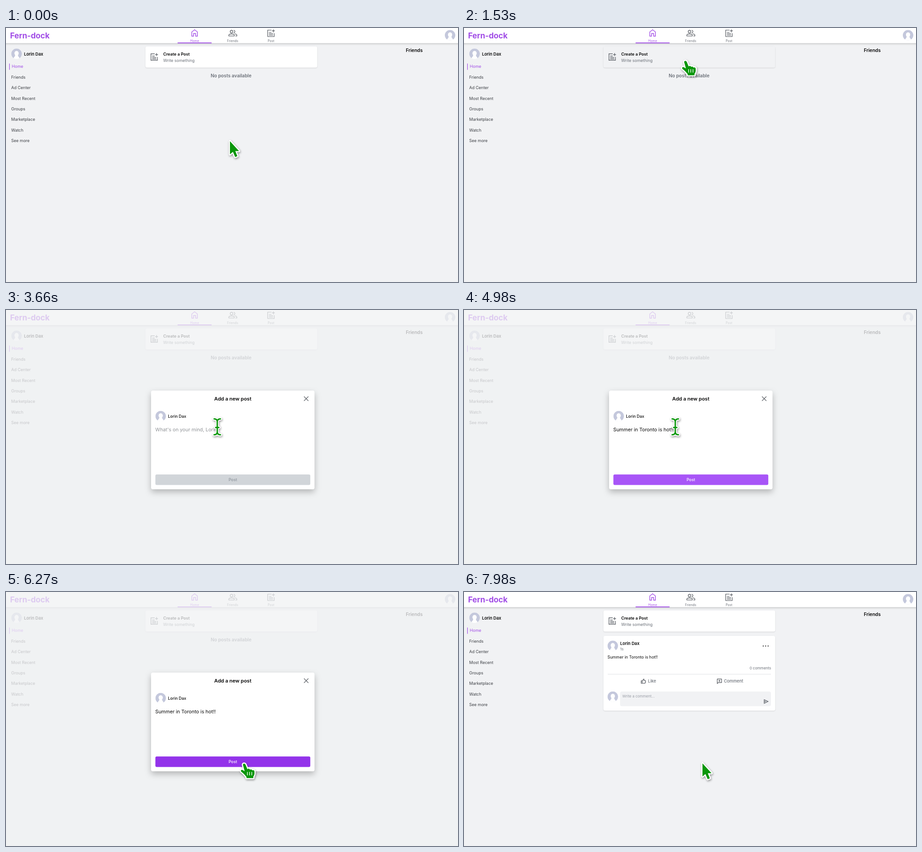
Write an HTML page that moves like this. It is 997x561 px and loops after 8000 ms.

```html
<!DOCTYPE html>
<html lang="en">
<head>
<meta charset="utf-8">
<title>Social feed</title>
<style>
  html, body { margin: 0; width: 100%; height: 100%; overflow: hidden; background: #f1f2f4; }
  svg { display: block; width: 100vw; height: 100vh; font-family: Inter, "Liberation Sans", sans-serif; }
  .line { fill: none; stroke: #666a70; stroke-width: 1.4; }
  .purple { stroke: #a04be6; }
  .card { fill: #fff; filter: drop-shadow(0 1px 1px rgba(0, 0, 0, .12)); }
  .nav { fill: #fff; filter: drop-shadow(0 1px 2px rgba(0, 0, 0, .25)); }
  .modal { fill: #fff; filter: drop-shadow(0 6px 7px rgba(0, 0, 0, .25)); }
  #cursor { filter: drop-shadow(1px 2px 2px rgba(0, 0, 0, .4)); }
  .solid { fill: #0a960a; stroke: #fff; stroke-width: 5; stroke-linejoin: round; paint-order: stroke; }
  .beam { fill: none; stroke-linecap: round; }
</style>
</head>
<body>
<svg id="stage" viewBox="0 0 997 561" xmlns="http://www.w3.org/2000/svg"></svg>
<script>
const LOOP = 8000;
const USER = 'Lorin Dax';
const MESSAGE = 'Summer in Toronto is hot!!';
const PURPLE = '#a04be6', GRAY = '#6b7078', INK = '#3c3f44';

const text = (x, y, str, size = 9, fill = INK, weight = 400, anchor = 'start', id = '') =>
  `<text id="${id}" x="${x}" y="${y}" font-size="${size}" fill="${fill}" font-weight="${weight}" text-anchor="${anchor}">${str}</text>`;
const rect = (x, y, w, h, attrs) => `<rect x="${x}" y="${y}" width="${w}" height="${h}" ${attrs}/>`;
const path = (d, cls = 'line') => `<path class="${cls}" d="${d}"/>`;
const use = (name, x, y) => `<use href="#${name}" x="${x}" y="${y}"/>`;

const defs = `<defs>
  <clipPath id="disc"><circle r="11.7"/></clipPath>
  <g id="avatar"><g clip-path="url(#disc)">
    <circle r="11.7" fill="#c4c8dc"/>
    <ellipse cy="-1.3" rx="4.7" ry="5.3" fill="#fff"/>
    <path d="M-7 12C-7 7.5-3.6 7-3 3H3C3.6 7 7 7.5 7 12Z" fill="#fff"/>
  </g></g>
  <g id="postIcon">
    ${path('M1-7H-7.3V7.3H7V0M-4.6-2H1M-4.6 1.2H4.4M-4.6 4.3H4.4M5.2-8.4V-2.2M2.1-5.3H8.3')}
  </g>
</defs>`;

const sidebar = ['Friends', 'Ad Center', 'Most Recent', 'Groups', 'Marketplace', 'Watch', 'See more']
  .map((label, i) => text(11.5, 111.8 + i * 23.4, label)).join('');

const page = `
  ${rect(0, 0, 997, 561, 'fill="#f1f2f4"')}
  ${rect(-5, -5, 1007, 38.5, 'class="nav"')}
  ${text(9, 23, 'Fern-dock', 17.2, PURPLE, 700)}
  ${path('M409.8 18V8.8L416 3.8L422.2 8.8V18H418.3V12.3H413.7V18Z', 'line purple')}
  ${text(416, 30.5, 'Home', 7, PURPLE, 400, 'middle')}
  ${rect(378.5, 32, 75, 1.8, `fill="${PURPLE}"`)}
  <circle class="line" cx="497.5" cy="8" r="3"/>
  ${path('M491.4 17.6V16C491.4 12.3 503.6 12.3 503.6 16V17.6ZM502.3 4.9A3.1 3.1 0 0 1 502.3 11M504.5 13C508 13.4 509.3 14.6 509.3 16V17.6H506')}
  ${text(500, 30.5, 'Friends', 7, GRAY, 400, 'middle')}
  ${use('postIcon', 584.6, 11.6)}
  ${text(584.5, 30.5, 'Post', 7, GRAY, 400, 'middle')}
  ${use('avatar', 979.5, 16)}
  ${use('avatar', 23.3, 57)}
  ${text(39.7, 60.5, USER, 9.3, '#080808', 600)}
  ${rect(7, 78.5, 1.2, 13.8, `fill="${PURPLE}"`)}
  ${text(12.8, 88.4, 'Home', 9, PURPLE)}
  ${sidebar}
  ${rect(307.5, 40.7, 379, 46.8, 'rx="4" class="card" id="create"')}
  ${use('postIcon', 327, 64)}
  ${text(346.7, 60.5, 'Create a Post', 9.1, '#080808', 600)}
  ${text(346.7, 74.6, 'Write something', 9, GRAY)}
  ${text(900.5, 52.5, 'Friends', 10.3, '#080808', 600, 'middle')}
  ${text(496.5, 108.7, 'No posts available', 10.2, GRAY, 600, 'middle', 'empty')}`;

const post = `<g id="post">
  ${rect(307.5, 97, 379, 165, 'rx="4" class="card"')}
  ${use('avatar', 328.2, 119)}
  ${text(344.5, 116.7, USER, 9.3, '#080808', 600)}
  ${text(344.5, 129.2, '1s', 8, GRAY)}
  ${[660, 665.4, 670.8].map(x => `<circle cx="${x}" cy="119.3" r="1.1"/>`).join('')}
  ${text(316.5, 147.2, MESSAGE, 8.95, '#080808')}
  ${text(677.3, 171, '0 comments', 8.1, GRAY, 400, 'end')}
  ${rect(317, 181, 360, 1, 'fill="#dfe1e5"')}
  <g stroke-linejoin="round">
    ${path('M390.8 196.3H393.2V201.6H390.8ZM393.2 196.5L396.3 192.2C397.6 192.2 397.5 193.6 396.9 195.6H400.4Q401.2 198.4 399.2 201.6H393.2')}
    ${path('M558.6 192.3H568.2V200H561L558.6 202.3ZM563.4 194.2V198.2M561.4 196.2H565.4')}
  </g>
  ${text(405.7, 200.3, 'Like', 9.2, GRAY, 500)}
  ${text(573.2, 200.3, 'Comment', 9.2, GRAY, 500)}
  ${use('avatar', 328.2, 231.3)}
  ${rect(344.3, 219.7, 332.7, 32.6, 'rx="4" fill="#f1f2f4"')}
  ${text(349.3, 233.2, 'Write a comment...', 8, '#989ca4')}
  ${path('M662.2 237.8L670.6 241.8L662.2 245.8ZM662.2 241.8H666')}
</g>`;

const modal = `<g id="dialog">
  ${rect(0, 0, 997, 561, 'fill="#f1f2f4" opacity=".76"')}
  ${rect(320, 178, 360.5, 218, 'rx="4" class="modal"')}
  ${text(500.3, 199.7, 'Add a new post', 11, '#080808', 600, 'middle')}
  ${path('M657.3 191L667 200.7M667 191L657.3 200.7')}
  ${use('avatar', 341.2, 234.5)}
  ${text(357.3, 238, USER, 8.9, '#080808', 500)}
  ${text(329.3, 268.2, '', 10.75, '#080808', 400, 'start', 'draft')}
  ${rect(0, 257, 1, 14.5, 'id="caret"')}
  ${rect(329.5, 363.3, 341.7, 23.3, 'rx="3" id="button"')}
  ${text(500.3, 378.3, 'Post', 8.9, '#fff', 500, 'middle', 'buttonLabel')}
</g>`;

const beamPath = 'M-7-17.5C-2-17.5 0-15 0-11V11C0 15-2 17.5-7 17.5M7-17.5C2-17.5 0-15 0-11M7 17.5C2 17.5 0 15 0 11M-3.5 1.5H3.5';
const cursor = `<g id="cursor">
  <g id="arrow">${path('M0 0V29L6.5 23.5L11.5 35L16.3 33L11.8 21.7H20Z', 'solid')}</g>
  <g id="hand" transform="translate(-1 -2)">
    ${path('M-2.5 5C-2 1.5 2 1.5 3.5 5L7.5 15C9 13 12.5 13.5 13 16C15 14.3 18 15.3 18 17.5C20.5 16 23 17.5 23 20C23.5 25 23 28 20.5 31V34.5H5.5V32C2 28-1 24-6 20.5C-8.5 17.5-5 15-2.5 17L1.5 19.5Z', 'solid')}
    <path d="M7.5 21V28.5M12.3 21V28.5M17.1 21V28.5" stroke="#fff" stroke-width="1.4"/>
  </g>
  <g id="beam">
    <path class="beam" d="${beamPath}" stroke="#fff" stroke-width="7"/>
    <path class="beam" d="${beamPath}" stroke="#0a960a" stroke-width="3"/>
  </g>
</g>`;

document.getElementById('stage').innerHTML = defs + page + post + modal + cursor;
const el = id => document.getElementById(id);
const show = (id, visible) => { el(id).style.display = visible ? '' : 'none'; };
const progress = (t, from, to) => Math.min(1, Math.max(0, (t - from) / (to - from)));

// Pointer keys: time, x, y
const KEYS = [
  [0, 494, 250], [750, 494, 250], [1530, 489, 72], [2220, 489, 72],
  [2430, 466, 165], [2680, 457, 280], [2910, 466, 258], [4980, 466, 258],
  [5480, 530, 401], [5770, 526, 378.5], [LOOP, 526, 378.5]
];

// Velocity is zero at rests and turning points.
function slope(i, axis) {
  if (i === 0 || i === KEYS.length - 1) return 0;
  const [a, b, c] = [KEYS[i - 1], KEYS[i], KEYS[i + 1]];
  if ((b[axis] - a[axis]) * (c[axis] - b[axis]) <= 0) return 0;
  return (c[axis] - a[axis]) / (c[0] - a[0]);
}

function pointer(t, axis) {
  const i = KEYS.findIndex((key, n) => n > 0 && t <= key[0]);
  const a = KEYS[i - 1], b = KEYS[i], span = b[0] - a[0];
  const u = (t - a[0]) / span, s = u * u * (3 - 2 * u);
  return a[axis] + (b[axis] - a[axis]) * s
    + span * u * (1 - u) * (slope(i - 1, axis) * (1 - u) - slope(i, axis) * u);
}

function cursorKind(t, y) {
  if (t < 1995) return y < 87.5 ? 'hand' : 'arrow';
  if (t >= 5820 && t < 6650) return 'hand';
  return t < 5820 && y > 252 && y < 355 ? 'beam' : 'arrow';
}

function render(t) {
  const x = pointer(t, 1), y = pointer(t, 2);
  const kind = cursorKind(t, y);
  ['arrow', 'hand', 'beam'].forEach(name => show(name, name === kind));
  el('cursor').setAttribute('transform', `translate(${x} ${y})`);
  el('create').style.fill = t < 1995 && y < 87.5 ? '#f1f2f4' : '#fff';

  el('dialog').style.opacity = progress(t, 1965, 2070) * (1 - progress(t, 6620, 6810));
  show('dialog', t > 1965 && t < 6810);

  const typed = Math.ceil(MESSAGE.length * progress(t, 4035, 4560));
  const draft = el('draft');
  draft.textContent = typed ? MESSAGE.slice(0, typed) : `What's on your mind, ${USER.split(' ')[0]}?`;
  draft.setAttribute('fill', typed ? '#080808' : '#8f9296');
  const caretOn = (t >= 3150 && t < 3660) || (t >= 4050 && t < 5280) || (t >= 5790 && t < 6225);
  show('caret', caretOn);
  el('caret').setAttribute('x', 330 + (typed ? draft.getComputedTextLength() : 0));

  const hovered = t > 4980 && y > 363 && y < 387;
  el('button').setAttribute('fill', !typed ? '#d1d5d9' : hovered ? '#9333ea' : '#a855f7');
  el('buttonLabel').setAttribute('fill', typed ? '#fff' : '#8f959d');

  show('empty', t < 7110);
  show('post', t >= 7110);
  el('post').style.opacity = 1 - (1 - progress(t, 7080, 7530)) ** 3;
}

function tick() {
  render(performance.now() % LOOP);
  requestAnimationFrame(tick);
}
tick();
</script>
</body>
</html>
```
